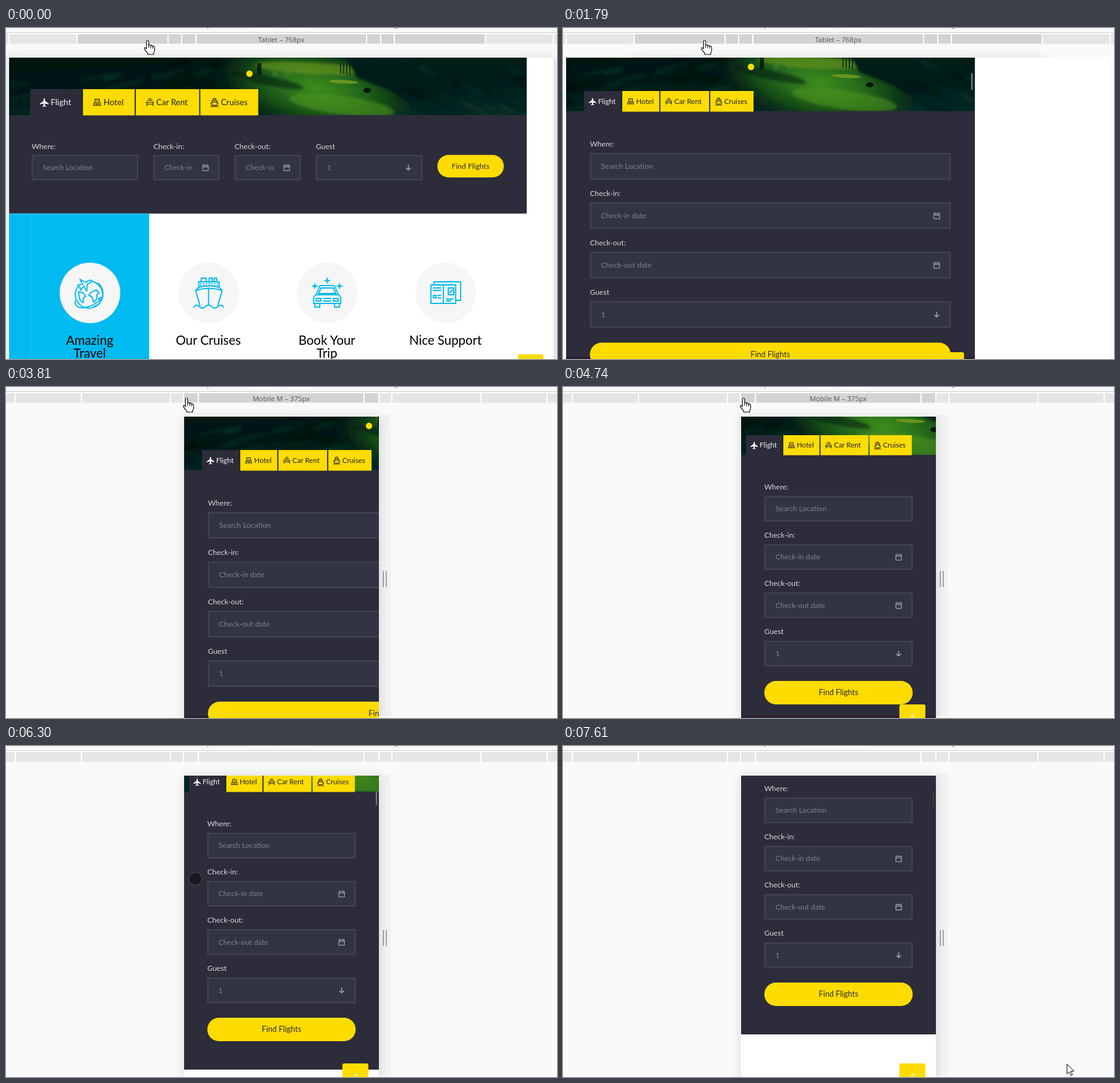
Animation, 891 px wide and 536 px high, one loop 7.7 s. Source, as an HTML page:

```html
<!DOCTYPE html>
<html lang="en">
<head>
<meta charset="utf-8">
<title>Responsive preview</title>
<style>
html, body { margin: 0; width: 100%; height: 100%; overflow: hidden; background: #fafafa; }
#stage { display: block; width: 891px; height: 536px; font-family: Lato, "Open Sans", sans-serif; }
#stage text { white-space: pre; }
#stage .ui { font-family: "Open Sans", "Noto Sans", sans-serif; }
#device { filter: drop-shadow(0 0 9px rgba(0, 0, 0, .13)); }
.line { fill: none; stroke-linecap: round; stroke-linejoin: round; }
</style>
</head>
<body>
<svg id="stage" width="891" height="536" viewBox="0 0 891 536"></svg>
<script>
const LOOP = 7700, CENTER = 445;
const NAVY = '#2c2c3b', YELLOW = '#ffdc00', CYAN = '#00b9ee', INK = '#22222c';
const stage = document.getElementById('stage');

const rect = (x, y, w, h, fill, more = '') =>
  `<rect x="${x}" y="${y}" width="${w}" height="${h}" fill="${fill}" ${more}/>`;
const circle = (x, y, r, fill, more = '') =>
  `<circle cx="${x}" cy="${y}" r="${r}" fill="${fill}" ${more}/>`;
const oval = (x, y, rx, ry, fill, turn = 0, alpha = 1) =>
  `<ellipse rx="${rx}" ry="${ry}" fill="${fill}" opacity="${alpha}" transform="translate(${x} ${y}) rotate(${turn})"/>`;
const path = (d, fill, more = '') => `<path d="${d}" fill="${fill}" ${more}/>`;
const line = (d, color, w = 1.2, more = '') =>
  `<path class="line" d="${d}" stroke="${color}" stroke-width="${w}" ${more}/>`;
const text = (x, y, s, size, fill, more = '') =>
  `<text x="${x}" y="${y}" font-size="${size}" fill="${fill}" ${more}>${s}</text>`;
const mid = 'text-anchor="middle"';
const at = (x, y, body, scale = 1) => `<g transform="translate(${x} ${y}) scale(${scale})">${body}</g>`;
const box = (x, y, w, h, body, more = '') =>
  `<svg x="${x}" y="${y}" width="${w}" height="${h}" overflow="hidden" ${more}>${body}</svg>`;
const repeat = (n, f) => Array.from({ length: n }, (_, i) => f(i)).join('');

// Night lake behind the tabs
function lake() {
  let seed = 11;
  const rnd = () => (seed = seed * 16807 % 2147483647) / 2147483647;
  const streaks = (n, x, w, turn, dark, lit) => repeat(n, i =>
    oval(x + rnd() * w, rnd() * 95, 14 + rnd() * 24, 2 + rnd() * 4, i % 2 ? dark : lit, turn, .2 + rnd() * .25));
  const soft = rect(-110, -20, 880, 140, 'url(#shore)') +
    streaks(40, -110, 370, -14, '#010b09', '#0b3a2c') +
    oval(410, 40, 175, 75, 'url(#glow)', 12) +
    oval(400, 8, 90, 9, '#6f9c1b', 3, .6) + oval(330, 28, 60, 8, '#04200f', 12, .6) +
    oval(450, 68, 85, 15, '#4f9a1e', 8, .55) +
    path('M450 -20H780V120H625L592 88 530 46 474 24Z', 'url(#bank)') +
    streaks(18, 560, 210, 28, '#01100f', '#0c332d');
  return `<g filter="url(#soft)">${soft}</g>` +
    oval(453, 30, 24, 3, '#7ca01d', 3, .75) + rect(313, 0, 7, 19, '#071b0e', 'opacity=".85"') +
    repeat(4, i => rect(447 + i * 5, 0, 2, 16 + i, '#06170f', 'opacity=".7"')) +
    oval(491, 44, 6, 4, '#08150f');
}
const photo = (w, h, dx, dy) => box(0, 48, w, h, at(dx, dy, lake()));
const dots = (x, y) => circle(x, y, 5.2, YELLOW) + repeat(2, i => circle(x + 41 + i * 21, y, 5, '#5f8f3a', 'opacity=".3"'));

const tabList = [
  ['Flight', 60, path('M0 -7Q1.3 -6 1.3 -2L7 2V3.6L1.3 2 1 5 3 6.6V7.6L0 6.8 -3 7.6V6.6L-1 5 -1.3 2 -7 3.6V2L-1.3 -2Q-1.3 -6 0 -7Z', '#fff')],
  ['Hotel', 60, line('M-6 5H6M-5 4V1H5V4M-3.5 1V-5H3.5V1M-1 -2H1M-2 3H2', INK)],
  ['Car Rent', 79, line('M-6 0H6M-4 -3H4M-2 -5.5H2M-5 3H5M-5 0V5.5M5 0V5.5', INK)],
  ['Cruises', 70, line('M-6 2L0 -1 6 2 4 5H-4ZM-4 1V-3H4V1M-2 -3V-6H2V-3M-6 7H6', INK)]
];
const calendar = line('M-4.5 -3.5H4.5V5H-4.5ZM-4.5 -1H4.5M-2.5 -5V-3M2.5 -5V-3', '#92929c', 1.4);
const arrow = (color, turn = 0) => `<g transform="rotate(${turn})">${line('M0 -4V4M-3.5 .8L0 4 3.5 .8', color, 1.6)}</g>`;

function tabs(x, y, h, pad, size) {
  return tabList.map(([name, base, icon], i) => {
    const w = base + pad, left = x, inset = 13.7 + pad * .39, cy = y + h / 2;
    x += w + 1.7;
    return rect(left, y, w, h, i ? YELLOW : NAVY) + at(left + inset, cy, icon, size / 13.5) +
      text(left + inset + size * .77, cy + size * .35, name, size, i ? INK : '#f0f0f3');
  }).join('');
}

const fields = [['Where:', 'Search Location'], ['Check-in:', 'Check-in date', calendar],
  ['Check-out:', 'Check-out date', calendar], ['Guest', '1', arrow('#a0a0aa')]];
function field([name, hint, icon], x, y, w, h, lift, size) {
  const cy = y + h / 2;
  return text(x, y - lift, name, 12, '#d9d9de') +
    rect(x + 1, y + 1, w - 2, h - 2, '#333443', 'stroke="#434455" stroke-width="2"') +
    box(x + 17, y, w - 60, h, text(1, h / 2 + 4, hint, size, '#7f808b')) +
    (icon ? at(x + w - 22.7, cy, icon) : '');
}
const form = (x, w, y, gap, h, size) => fields.map((f, i) => field(f, x, y + i * gap, w, h, 10.8, size)).join('');
const pill = (x, y, w, h, size) => rect(x, y, w, h, YELLOW, `rx="${h / 2}"`) +
  text(x + w / 2, y + h / 2 + 4, 'Find Flights', size, NAVY, mid);

const star = (x, y) => at(x, y, path('M0 -5Q0 0 5 0 0 0 0 5 0 0 -5 0 0 0 0 -5Z', CYAN, `stroke="${CYAN}"`));
const globe = line('M-18 -12A22 22 0 1 0 2 -19M13 -16A22 22 0 0 1 6 22M-24 13Q-25 24 -12 24 8 22 21 6', CYAN, 1.9) +
  line('M-19 -2L-11 0 -7 5 -11 9 -11 16 -16 12ZM2 -1L10 -5 15 0 11 3 11 10 6 15 3 6 -2 4ZM14 9L20 7 17 14Z', CYAN, 1.9) +
  at(-8, -14, `<g transform="rotate(60) scale(1.6)">${line('M0 -8Q2 -6 1 -2L7 2 1 2 3 7 0 6 -3 7 -1 2 -7 2 -1 -2Q-2 -6 0 -8Z', CYAN, 1.1)}</g>`);
const ship = line('M-12 -24H-4V-18H-12ZM1 -24H6V-18H1ZM9 -24H13V-18H9ZM-16 -9V-18H17V-9M-21 -4L-16 -9Q0 -14 17 -9L22 -4 15 20M-21 -4L-14 20M-21 -4Q0 -11 22 -4M0 -8V20M-24 23Q-20 17 -15 22T-5 22 5 22 15 22 24 23', CYAN, 1.9) +
  line('M-13 -15H15M-13 -12H15', CYAN, 2, 'stroke-dasharray=".5 4"');
const car = repeat(3, i => star(i * 20 - 20, i === 1 ? -20 : -11)) +
  line('M-18 3L-13 -9Q-12 -12 -9 -12H9Q12 -12 13 -9L18 3M-14 1L-10 -8H10L14 1ZM-18 3H18Q22 5 22 10V17H-22V10Q-22 5 -18 3ZM-20 17V23H-12V17M20 17V23H12V17M-6 9H6M-6 13H6M-18 9H-10V13H-18ZM10 9H18V13H10Z', CYAN, 1.9);
const news = line('M-24 -13H16V17H-24ZM-19 -13V-18H24V12H16M-4 -11V16M-20 -8H-8M-20 -4H-8M-20 4H-16V8H-20ZM-13 4H-8M-13 8H-8M1 10H12M1 13H8M4 -8H13V3H4ZM6 0L11 -5', CYAN, 1.9);
const cards = [[globe, 'Amazing', 'Travel'], [ship, 'Our Cruises'], [car, 'Book Your', 'Trip'], [news, 'Nice Support']];

function wide() {
  let x = 41.5;
  const row = fields.map((f, i) => {
    const w = i % 3 ? 107 : 172.5, left = x;
    x += w + 24.3;
    return field(f, left, 205.5, w, 41, 9.5, 11.6);
  }).join('');
  const items = cards.map(([icon, ...words], i) => {
    const cx = 135.8 + i * 191.8;
    return circle(cx, 429, 49, '#f6f6f6') + at(cx, 429, icon) +
      words.map((s, k) => text(cx - .5, 513 + k * 21, s, 20.4, '#000', mid)).join('');
  }).join('');
  return box(5, 0, 837, 150, photo(837, 94, 88, 9)) + dots(393.7, 74) + rect(5, 141, 837, 159.5, NAVY) +
    tabs(39, 99, 42.5, 23.7, 13.4) + row + pill(697.5, 205.5, 107.5, 36.5, 12.1) +
    rect(5, 300.5, 226.5, 236, '#00baf0') + rect(39, 300.5, 1, 236, '#2cc7f4') + items +
    rect(828, 528.5, 41, 30, YELLOW, 'rx="3"');
}

function medium() {
  return rect(0, 48, 661, 488, NAVY) + photo(661, 86.5, 0, 0) + dots(299, 63) +
    tabs(29, 102, 33.5, 0, 11.6) + form(38.5, 583.5, 202.5, 80, 43, 12.1) +
    rect(0, 532.5, 661, 4, '#2c2030') + pill(38.5, 509.5, 583.5, 38, 12.6) +
    rect(602, 525, 41.5, 30, YELLOW, 'rx="3"') + rect(655, 73, 2.5, 27, '#77777f', 'id="barM"');
}

function small() {
  return rect(0, 48, 315, 488, '#fff') + '<g id="scroll">' +
    rect(0, 48, 315, 512, NAVY) + photo(315, 62, -179, -23) +
    tabs(8, 78, 32.5, -1.5, 11.4) + form(37.5, 240, 176.5, 78.15, 41.5, 11.9) +
    pill(37.5, 476, 240, 38, 12.6) + '</g>' + rect(0, 532, 315, 4, '#2c2030', 'id="strip"') +
    rect(256, 514, 42, 40, YELLOW, 'rx="3"') + at(277.5, 535, arrow('#fff1a0', 180)) +
    rect(310, 73, 2, 22, '#7d7d86', 'id="barS"');
}

const stops = list => list.map((c, i) => `<stop offset="${i / (list.length - 1)}" stop-color="${c}"/>`).join('');
const grad = (id, ...list) => `<linearGradient id="${id}" x2=".3" y2="1">${stops(list)}</linearGradient>`;
const page = (id, w, body) => box(0, 48, w, 488, at(0, -48, body), `id="${id}"`);

stage.innerHTML = '<defs>' +
  grad('shore', '#02110e', '#031a16', '#05302a') + grad('bank', '#06211b', '#021a17', '#07302a') +
  `<radialGradient id="glow">${stops(['#3f8c1c', '#2a701c', '#124617', '#06231500'])}</radialGradient>` +
  '<filter id="soft" x="-5%" y="-20%" width="110%" height="140%"><feGaussianBlur stdDeviation="2"/></filter></defs>' +
  rect(0, 0, 891, 536, '#fafafa') + rect(0, 0, 891, 7, '#f8f8f8') +
  rect(395, 0, 42, 3, '#fff') + rect(452, 0, 42, 3, '#fff') +
  rect(326, 0, 1, 2, '#777') + rect(628, 0, 5, 1, '#999') + rect(0, 7, 891, 1, '#cbcbcb') +
  rect(0, 8, 891, 18, '#fff') + '<g id="ruler"></g>' +
  text(CENTER, 23, '', 11.3, '#555', mid + ' class="ui" id="tag"') +
  `<g id="grip">${rect(0, 48, 20, 488, '#f2f2f2')}${repeat(2, i => rect(7 + i * 4.7, 301, 1.4, 26, '#888'))}</g>` +
  '<rect id="device" y="48" height="500" fill="#fff"/>' + rect(5, 48, 880, 488, '#fff', 'id="paper"') +
  `<g id="wide">${wide()}</g>` + page('medium', 661, medium()) + page('small', 315, small()) +
  circle(0, 0, 12, '#ffff00', 'opacity=".47" id="click"') +
  '<g id="hand">' + path('M-1.8 14V2Q-1.8 0 0 0T1.8 2V8.2Q2 7 3.4 7T5 8.6V9.2Q5.4 8 6.7 8.1T8.3 9.8V10.4Q8.7 9.2 10 9.5T11.4 11.3V16Q11.2 18.3 9.8 20.3V22.8H.2V20.6Q-2.6 18 -4.8 14.4 -5.8 12.4 -4.4 11.8 -3 11.5 -1.8 14Z', '#fff', 'stroke="#000" stroke-width="1.1"') +
  line('M1.8 8V12M5 9V12.5M8.3 10V13', '#000', 1) + '</g>' +
  path('M0 0V16L3.7 12.5 6.3 18.5 8.8 17.4 6.3 11.6H11.3Z', '#fff', 'stroke="#000" id="arrow"') +
  circle(0, 0, 10.3, '#16141c', 'fill-opacity=".85" stroke="#4a4a56" id="touch"');

const el = {};
stage.querySelectorAll('[id]').forEach(n => el[n.id] = n);
const show = (n, on) => n.style.display = on ? '' : 'none';
const place = (n, x, y) => n.setAttribute('transform', `translate(${x} ${y})`);

// Preset screen widths; half a bar is width * zoom / 2
const screens = [[320, 'Mobile S'], [375, 'Mobile M'], [425, 'Mobile L'], [768, 'Tablet'], [1024, 'Laptop'], [1440, 'Laptop L']];
const half = (i, zoom) => screens[i][0] * zoom / 2;

let drawn = '';
function ruler(zoom, hover) {
  const key = zoom + '/' + hover;
  if (drawn === key) return;
  drawn = key;
  el.ruler.innerHTML = screens.map((_, i) => {
    const out = Math.round(half(i, zoom)) - 1, inner = i ? Math.round(half(i - 1, zoom)) + 1 : -out;
    const fill = i <= hover ? '#d3d3d3' : '#e5e5e5', bar = x => rect(x, 10, out - inner, 15.5, fill);
    return i ? bar(CENTER - out) + bar(CENTER + inner) : bar(CENTER - out).replace(out - inner, 2 * out);
  }).join('');
  el.tag.textContent = hover < 0 ? '' : `${screens[hover][1]} – ${screens[hover][0]}px`;
}

// Progress 0..1 in n visible steps from t0 to t1, slowing down at the end
function glide(t, t0, t1, n, power) {
  if (t < t0) return 0;
  const k = Math.min(n, Math.floor((t - t0 + 20) / (t1 - t0) * (n - 1)) + 1);
  return 1 - (1 - k / n) ** power;
}

const moves = [[2660, 3120, 7, 292, 18], [5130, 5590, 7, 306, 215], [7230, 7610, 6, 815, 515]];
function pointer(t) {
  let x = 229, y = 20;
  for (const [t0, t1, n, tx, ty] of moves) {
    const p = glide(t, t0, t1, n, 1.5);
    x += (tx - x) * p;
    y += (ty - y) * p;
  }
  return [x, y];
}

function draw(t) {
  const zoom = t < 3650 ? .86 : .84;
  const size = t < 1480 ? 4 : t < 3650 ? 3 : 1;
  const reach = half(size, zoom);
  el.device.setAttribute('x', CENTER - reach);
  el.device.setAttribute('width', reach * 2);
  place(el.grip, CENTER + reach, size > 1 ? 3 : -3);

  show(el.paper, t < 1940);
  show(el.wide, t < 1790);
  show(el.medium, t >= 1790 && t < 4430);
  show(el.small, t >= 4430);
  el.medium.setAttribute('x', t < 1940 ? 5 : t < 3810 ? 115 : 288);
  el.medium.setAttribute('width', t < 3810 ? 661 : 315);
  el.small.setAttribute('x', 288);
  el.barM.style.opacity = t < 2180 ? 1 : t < 2260 ? .45 : 0;

  const roll = Math.round(93 * glide(t, 6080, 6920, 12, 1.2));
  place(el.scroll, 0, -roll);
  place(el.barS, 0, roll / 60);
  el.barS.style.opacity = !roll ? 0 : t < 6920 ? 1 : .2;
  show(el.strip, !roll);

  const [x, y] = pointer(t), onRuler = y < 26, inPage = y > 48 && x < 603;
  ruler(zoom, onRuler ? screens.findIndex((_, i) => half(i, zoom) >= CENTER - x) : -1);
  show(el.hand, onRuler);
  show(el.touch, inPage);
  show(el.arrow, !onRuler && !inPage);
  [el.hand, el.touch, el.arrow, el.click].forEach(n => place(n, x, y));
  show(el.click, t >= 230 && t < 400 || t >= 3420 && t < 3580);
}

const start = performance.now();
function tick() {
  draw((performance.now() - start) % LOOP);
  requestAnimationFrame(tick);
}
tick();
</script>
</body>
</html>
```
